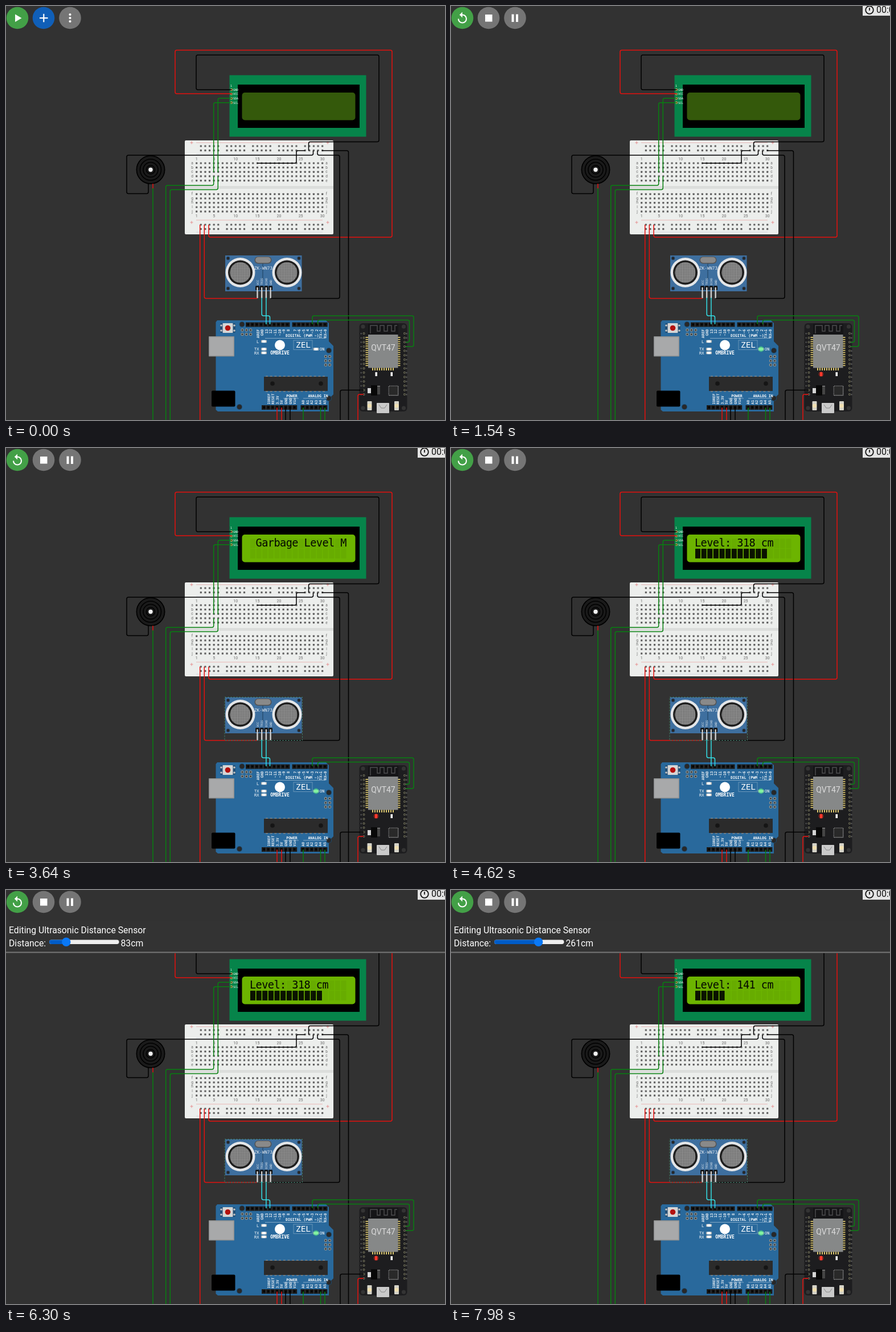
Write an HTML page with a canvas that moves like this. It is 771 px wide and 727 px high and loops after 8 s.

```html
<!DOCTYPE html>
<html lang="en">
<head>
<meta charset="utf-8">
<title>Circuit simulation</title>
<style>
html, body { margin: 0; width: 100%; height: 100%; overflow: hidden; background: #323232; }
canvas { display: block; }
</style>
</head>
<body>
<canvas id="stage" width="771" height="727"></canvas>
<script>
const W = 771, H = 727, LOOP = 8000, TAU = Math.PI * 2;
const SANS = 'Roboto, sans-serif';
const MONO = '"DejaVu Sans Mono", monospace';
const screen = document.getElementById('stage').getContext('2d');
const board = document.createElement('canvas');
board.width = W;
board.height = H;
let g = board.getContext('2d');

function rect(x, y, w, h, color, r = 0) {
  g.fillStyle = color;
  g.beginPath();
  g.roundRect(x, y, w, h, r);
  g.fill();
}
function disc(x, y, r, color) {
  g.fillStyle = color;
  g.beginPath();
  g.arc(x, y, r, 0, TAU);
  g.fill();
}
function ring(x, y, r, color, width = 1) {
  g.strokeStyle = color;
  g.lineWidth = width;
  g.beginPath();
  g.arc(x, y, r, 0, TAU);
  g.stroke();
}
function poly(color, ...p) {
  g.fillStyle = color;
  g.beginPath();
  for (let i = 0; i < p.length; i += 2) g.lineTo(p[i], p[i + 1]);
  g.fill();
}
function line(color, width, ...p) {
  g.strokeStyle = color;
  g.lineWidth = width;
  g.beginPath();
  for (let i = 0; i < p.length; i += 2) g.lineTo(p[i], p[i + 1]);
  g.stroke();
}
function wire(color, ...p) {
  g.strokeStyle = color;
  g.lineWidth = 1.5;
  g.beginPath();
  g.moveTo(p[0], p[1]);
  for (let i = 2; i < p.length - 2; i += 2) g.arcTo(p[i], p[i + 1], p[i + 2], p[i + 3], 3);
  g.lineTo(p.at(-2), p.at(-1));
  g.stroke();
}
function text(s, x, y, size, color = '#fff', align = 'left', font = SANS, weight = '') {
  g.font = `${weight} ${size}px ${font}`;
  g.fillStyle = color;
  g.textAlign = align;
  g.fillText(s, x, y);
}
function upText(s, x, y, size, align = 'left', weight = 'bold') {
  g.save();
  g.translate(x, y);
  g.rotate(-Math.PI / 2);
  text(s, 0, 0, size, '#e4ebf1', align, MONO, weight);
  g.restore();
}

function drawBuzzer() {
  disc(254, 287.5, 25.5, '#1a1a1a');
  for (const r of [24.5, 18.5, 13, 7.5]) ring(254, 287.5, r, '#000', 1.6);
  disc(254, 287.5, 3.7, '#f2f2f2');
}

function drawDisplayBoard() {
  rect(392.5, 121.5, 240, 108, '#06844a');
  rect(407, 138, 214, 76, '#000');
  text('1', 394, 142, 5, '#fff', 'left', MONO);
  ['GND', 'VCC', 'SDA', 'SCL'].forEach((s, i) => {
    const y = 147 + i * 7.6;
    disc(396, y, 2.2, '#c9a45c');
    disc(396, y, 1.1, '#3a3a2a');
    text(s, 399, y + 1.8, 5, '#fff', 'left', MONO);
  });
}

function drawBreadboard() {
  const pitch = 7.62, left = 334.7;
  const hole = (col, y) => rect(left + col * pitch - 1.6, y - 1.6, 3.2, 3.2, '#616161', 0.6);
  rect(314, 236, 261, 165, '#eceeec', 2);
  rect(314, 316, 261, 5, '#dcdedc');
  for (const y of [240, 376]) line('#e9b5b5', 1, 334, y, 556, y);
  for (const y of [260, 397]) line('#d5d9e0', 1, 334, y, 556, y);
  for (const x of [326, 565]) for (const y of [240, 380]) {
    line('#e58f8f', 1, x - 2.5, y, x + 2.5, y);
    line('#e58f8f', 1, x, y - 2.5, x, y + 2.5);
  }
  for (let c = 1; c < 30; c++) {
    if (c % 6 === 0) continue;
    for (const y of [246, 253.7, 384, 391.7]) hole(c, y);
  }
  for (let c = 0; c < 30; c++) for (let r = 0; r < 5; r++) {
    hole(c, 276 + r * 7.65);
    hole(c, 330.3 + r * 7.65);
  }
  for (const n of [1, 5, 10, 15, 20, 25, 30]) {
    const x = left + (n - 1) * pitch;
    text(n, x, 270.5, 7, '#6a6a6a', 'center');
    text(n, x, 370.5, 7, '#6a6a6a', 'center');
  }
  [...'abcdefghij'].forEach((s, i) => {
    const y = i < 5 ? 278 + i * 7.65 : 332 + (i - 5) * 7.65;
    text(s, 327, y, 6.5, '#6a6a6a', 'center');
    text(s, 563, y, 6.5, '#6a6a6a', 'center');
  });
}

function drawTransducer(x, y) {
  disc(x, y, 26, '#e4e6e8');
  disc(x, y, 21.5, '#1e1e1e');
  disc(x, y, 18, '#505050');
  g.save();
  g.beginPath();
  g.arc(x, y, 18, 0, TAU);
  g.clip();
  for (let d = -18; d <= 18; d += 2.6) {
    line('#a8a8a8', 0.9, x + d, y - 18, x + d, y + 18);
    line('#a8a8a8', 0.9, x - 18, y + d, x + 18, y + d);
  }
  g.restore();
}

function drawSensor() {
  rect(385, 438, 134.5, 63, '#3e6f9f');
  for (const x of [390, 514.5]) for (const y of [443, 496]) {
    disc(x, y, 3.2, '#2b4663');
    disc(x, y, 2.2, '#262626');
  }
  rect(450, 450, 2, 30, '#2d567d');
  drawTransducer(411.5, 468);
  drawTransducer(493.5, 468);
  rect(436.5, 440, 30, 12.5, '#555', 6);
  rect(438, 441, 27, 10, '#898989', 5);
  text('ZK-WN73', 452, 463, 7.6, '#e8eef4', 'center', MONO);
  ['VCC', 'TRIG', 'ECHO', 'GND'].forEach((s, i) => {
    const x = 441.5 + i * 7.7;
    upText(s, x + 2, 490, 5, 'left', '');
    rect(x - 3.4, 491.5, 6.8, 7.5, '#111', 1);
    rect(x - 1.2, 494, 2.4, 19, '#cfcfcf');
  });
}

function header(x, y, count) {
  rect(x, y, count * 7.65 + 1, 8, '#1b1b1b');
  for (let i = 0; i < count; i++) rect(x + i * 7.65 + 2.3, y + 2, 3.6, 3.6, '#050505');
  for (let i = 1; i < count; i++) line('#3e4a54', 0.7, x + i * 7.65, y, x + i * 7.65, y + 8);
}

function drawController() {
  poly('#29699c', 371, 552, 562, 552, 567, 557, 567, 589, 575, 597, 575, 682, 567, 690,
    567, 712, 372, 712, 368.5, 709, 368.5, 555);
  rect(356, 580, 45, 35.5, '#8f9192', 1);
  rect(357.5, 581.5, 42, 32.5, '#a8a9aa');
  rect(361, 675.5, 41.5, 28, '#000', 2);
  rect(376, 557, 27, 17, '#214f76', 2);
  rect(380.5, 557, 18, 17, '#d5d5d5', 1);
  for (const x of [378, 401]) for (const y of [561, 570]) disc(x, y, 1.8, '#c4c4c4');
  disc(389.5, 565.5, 4.8, '#b3120f');
  for (const [x, y] of [[414.5, 559], [567, 605], [567, 689], [410, 704]]) {
    disc(x, y, 5, '#1d4a6e');
    disc(x, y, 4, '#282828');
  }
  const pad = (x, y) => { disc(x, y, 2.7, '#8c9291'); disc(x, y, 1.5, '#343b40'); };
  for (let i = 0; i < 6; i++) {
    pad(415 + (i % 3) * 7.3, i < 3 ? 569 : 576.5);
    pad(i < 3 ? 561.5 : 568.5, 615.5 + (i % 3) * 7.4);
  }
  header(421, 555.5, 10);
  header(502.5, 555.5, 8);
  header(449, 701, 8);
  header(517.5, 701, 6);

  ['AREF', 'GND', '13', '12', '~11', '~10', '~9', '8'].forEach((s, i) =>
    upText(s, 444.5 + i * 7.6, 567.5, 6.5, 'right'));
  ['7', '~6', '~5', '4', '~3', '2', 'TX→1', 'RX←0'].forEach((s, i) =>
    upText(s, 509.5 + i * 7.6, 567.5, 6.5, 'right'));
  text('DIGITAL (PWM ~)', 491, 580.5, 6.5, '#fff', 'left', MONO, 'bold');
  line('#a9c3d8', 0.7, 455, 583.5, 561, 583.5);
  disc(481, 595.5, 9, '#fff');
  text('OMBRIVE', 481, 612, 8, '#fff', 'center', MONO, 'bold');
  g.strokeStyle = '#7fa6c4';
  g.lineWidth = 0.7;
  g.strokeRect(505, 587, 33, 16.5);
  text('ZEL', 522, 600, 14.5, '#fff', 'center', MONO);
  text('L', 440, 591.5, 7, '#fff', 'left', MONO);
  text('TX', 436, 605, 7, '#fff', 'left', MONO);
  text('RX', 436, 612, 7, '#fff', 'left', MONO);
  text('ON', 551, 605, 7, '#fff', 'left', MONO);
  for (const [x, y] of [[453, 589], [453, 602.5], [453, 609], [544.5, 602.5]]) {
    rect(x - 5, y - 2.2, 10, 4.4, '#b9bcbc');
    rect(x - 3, y - 2.2, 6, 4.4, '#fff');
  }

  for (let i = 0; i < 14; i++) rect(456 + i * 7.7, 649.5, 4, 28, '#7d8488');
  rect(453, 651, 112, 25, '#2b2b2b');
  disc(468, 663, 3.8, '#151515');
  disc(553, 663, 3.8, '#151515');
  text('POWER', 502, 687, 6.5, '#fff', 'center', MONO, 'bold');
  text('ANALOG IN', 548, 687, 6.5, '#fff', 'center', MONO, 'bold');
  line('#a9c3d8', 0.7, 487, 689, 514, 689);
  line('#a9c3d8', 0.7, 522, 689, 564, 689);
  ['IOREF', 'RESET', '3.3V', '5V', 'GND', 'GND', 'Vin'].forEach((s, i) =>
    upText(s, 463.5 + i * 7.6, 699.5, 6.3));
  for (let i = 0; i < 6; i++) upText('A' + i, 524 + i * 7.6, 699.5, 6.3);
}

function drawModule() {
  rect(620.5, 557, 84, 155, '#1d1d1f', 6);
  for (const x of [627, 698.5]) for (const y of [563, 706]) disc(x, y, 3.6, '#343434');
  rect(636, 558, 53, 19, '#151517');
  line('#4e4e50', 1.4, 640, 575, 640, 561, 652, 561, 652, 571, 657, 571, 657, 561, 664, 561, 664, 571,
    670, 571, 670, 561, 677, 561, 677, 571, 683, 571, 683, 561, 687, 561);
  for (let i = 0; i < 14; i++) {
    rect(631.5, 581 + i * 3.8, 5, 1.8, '#d8c46c');
    rect(687.5, 581 + i * 3.8, 5, 1.8, '#d8c46c');
  }
  for (let i = 0; i < 10; i++) rect(643 + i * 4, 635, 2, 5, '#d8c46c');
  rect(636, 577, 52.5, 58.5, '#868888');
  text('QVT47', 662.5, 605, 14, '#dcdcdc', 'center');
  for (let i = 0; i < 15; i++) for (const x of [628.5, 700]) {
    const y = 575 + i * 7.65;
    disc(x, y, 2, '#77765f');
    disc(x, y, 1, '#171717');
    rect(x < 660 ? 623 : 703, y - 1, 1.2, 2.4, '#777');
  }
  rect(648.5, 643, 3.5, 7, '#fff');
  rect(675.5, 643, 3.5, 7, '#fff');
  rect(635, 671, 7, 9, '#d5d5d5');
  for (let i = 0; i < 3; i++) rect(650, 667 + i * 6, 7, 3, '#999');
  rect(641, 666, 11, 18, '#080808');
  rect(652, 668, 5, 14, '#454545');
  for (let i = 0; i < 7; i++) {
    rect(673 + i * 2.4, 666.5, 1, 18, '#a0a0a0');
    rect(671.5, 668 + i * 2.4, 18, 1, '#a0a0a0');
  }
  rect(673, 668, 15, 15, '#292929');
  for (const x of [638.5, 686]) {
    rect(x - 4, 694, 8, 16, '#d5d3c8', 1);
    disc(x, 702, 3.6, '#f0dfb0');
  }
  rect(651, 697, 22, 18, '#cacaca', 1);
  line('#888', 1, 655, 700, 659, 706, 665, 706, 669, 700);
}

function drawWires() {
  const red = '#e6100e', black = '#000', green = '#078010', cyan = '#35dfe6';
  wire(red, 396, 154, 297, 154, 297, 77.5, 678, 77.5, 678, 406, 356, 406, 356, 384);
  wire(red, 340.7, 384, 340.7, H);
  wire(red, 348.3, 384, 348.3, 513.5, 441.5, 513.5);
  wire(red, 258, 312, 258, 321);
  wire(black, 396, 147, 334, 147, 334, 86, 655, 86, 655, 238.5, 531.5, 238.5, 531.5, 254);
  wire(black, 250, 311, 250, 329.5, 212, 329.5, 212, 262, 539.5, 262, 539.5, 254);
  wire(black, 465, 513.5, 586, 513.5, 586, 262, 547, 262, 547, 254);
  wire(black, 441, 276, 510, 276, 510, 254, 525, 254);
  wire(black, 555, 254, 601.5, 254, 601.5, H);
  wire(green, 396, 162, 372.3, 162, 372.3, 292);
  wire(green, 396, 169.7, 364.7, 169.7, 364.7, 292);
  wire(green, 372.3, 299, 372.3, 322.5, 288.3, 322.5, 288.3, H);
  wire(green, 364.7, 299, 364.7, 315, 280.7, 315, 280.7, H);
  wire(green, 258, 320, 258, H);
  wire(cyan, 449.2, 512, 449.2, 544, 463.5, 544, 463.5, 559);
  wire(cyan, 456.9, 512, 456.9, 559);
  wire(green, 538, 559, 538, 544, 716, 544, 716, 598, 702, 598);
  wire(green, 547.5, 559, 547.5, 551.5, 708.5, 551.5, 708.5, 590.5, 702, 590.5);
  wire(black, 628, 674.5, 587, 674.5, 587, H);
  wire(red, 628, 682, 618, 682, 618, H);
  [476, 484].forEach(x => wire(red, x, 705, x, H));
  [491, 499].forEach(x => wire(black, x, 705, x, H));
  [522, 552.5, 560].forEach(x => wire(green, x, 705, x, H));
}

function drawToolbar(running) {
  disc(20, 21, 19.3, '#43a047');
  disc(66, 21, 19.3, running ? '#757575' : '#105fb8');
  disc(112.5, 21, 19.3, '#757575');
  if (!running) {
    poly('#fff', 16, 14.5, 27.5, 21.2, 16, 28);
    rect(59, 20, 14.5, 2.2, '#fff');
    rect(65.2, 13.8, 2.2, 14.5, '#fff');
    for (const y of [15, 21, 27]) disc(112.5, y, 2.1, '#fff');
    return;
  }
  g.strokeStyle = '#fff';
  g.lineWidth = 2.1;
  g.beginPath();
  g.arc(20, 22.5, 7, -Math.PI / 2, Math.PI);
  g.stroke();
  poly('#fff', 20, 10.5, 20, 20.5, 14.8, 15.5);
  rect(60, 15, 12.5, 12.5, '#fff');
  rect(106.5, 14.5, 4, 13.5, '#fff');
  rect(114, 14.5, 4, 13.5, '#fff');
  rect(723, 0, 48, 17, '#e4e4e4');
  ring(735, 7, 6.8, '#111', 1.8);
  line('#111', 1.7, 735, 3, 735, 8);
  text('00:00', 747, 12, 16, '#111');
}

// Characters appear one by one within the given span.
const typed = (s, t, from, span) => s.slice(0, Math.ceil(s.length * Math.min(1, Math.max(0, (t - from) / span))));

function displayRows(t) {
  if (t < 4060) return [typed(' Garbage Level M', t, 1960, 200), ''];
  const late = t >= 7630;
  const top = late ? 'Level: 141 cm' : 'Level: 318 cm';
  const bars = '#'.repeat(late ? 5 : 12);
  const all = typed(top + bars, t, late ? 7630 : 4060, 200);
  return [all.slice(0, top.length), all.slice(top.length)];
}

function drawDisplay(t) {
  const on = t >= 1960, pitch = 10.63;
  rect(414.5, 152, 199, 48.5, on ? '#6cb400' : '#34590b', 5);
  if (!on) return;
  displayRows(t).forEach((row, r) => {
    const y = 159 + r * 17.9;
    for (let c = 0; c < 16; c++) {
      const x = 429 + c * pitch, ch = row[c];
      rect(x, y, 9, 17, ch === '#' ? '#040800' : '#67ac00');
      if (ch === '#') {
        for (let k = 1; k < 5; k++) rect(x + k * 1.8 - 0.1, y, 0.2, 17, 'rgba(108,180,0,.6)');
      } else if (ch) {
        text(ch, x + 4.5, y + 14.2, 18.6, '#040800', 'center', MONO);
      }
    }
  });
}

function drawLights() {
  disc(544.5, 602.5, 5, 'rgba(80,230,130,.55)');
  disc(544.5, 602.5, 3, '#80f4a0');
  disc(650, 646.5, 4.5, 'rgba(255,40,30,.4)');
  rect(648, 643, 4.2, 7, '#ff3a2c', 1);
}

function drawOutline() {
  g.setLineDash([3, 2]);
  g.strokeStyle = '#3f7867';
  g.lineWidth = 1;
  g.strokeRect(384, 437.5, 136.5, 76);
  g.setLineDash([]);
}

const ease = p => p * p * (3 - 2 * p);
const ramp = (t, a, b) => ease(Math.min(1, Math.max(0, (t - a) / (b - a))));

function drawPanel(t) {
  const open = ramp(t, 5040, 5320);
  if (!open) return;
  const bottom = 54 + 57 * open;
  const value = Math.round(83 + 178 * ramp(t, 6650, 7400));
  const thumb = 84 + (value - 2) / 398 * 107;
  const hover = t >= 5880, dragging = t >= 6650 && t < 7560;
  g.save();
  g.beginPath();
  g.rect(0, 54, W, bottom - 54);
  g.clip();
  rect(0, 54, W, 57, '#333');
  text('Editing Ultrasonic Distance Sensor', 5, 76, 15.75);
  text('Distance:', 5, 99, 15.75);
  rect(76, 87.5, 122.5, 7.5, '#efefef', 4);
  rect(76, 87.5, thumb - 76, 7.5, hover ? '#005cc8' : '#0075ff', 4);
  disc(thumb, 91.3, 7.7, dragging ? '#2a88fa' : '#0a78f5');
  text(value + 'cm', 201.5, 99, 15.75);
  rect(0, bottom - 2.5, W, 2, '#777');
  g.restore();
}

[drawBuzzer, drawDisplayBoard, drawBreadboard, drawSensor, drawController, drawModule, drawWires].forEach(draw => draw());
g = screen;

function frame(now) {
  const t = now % LOOP, running = t >= 1120;
  rect(0, 0, W, H, '#323232');
  g.drawImage(board, 0, 0);
  drawDisplay(t);
  if (running) drawLights();
  if (t >= 3640 || (t >= 2450 && t < 2520)) drawOutline();
  drawPanel(t);
  drawToolbar(running);
  requestAnimationFrame(frame);
}
requestAnimationFrame(frame);
</script>
</body>
</html>
```
